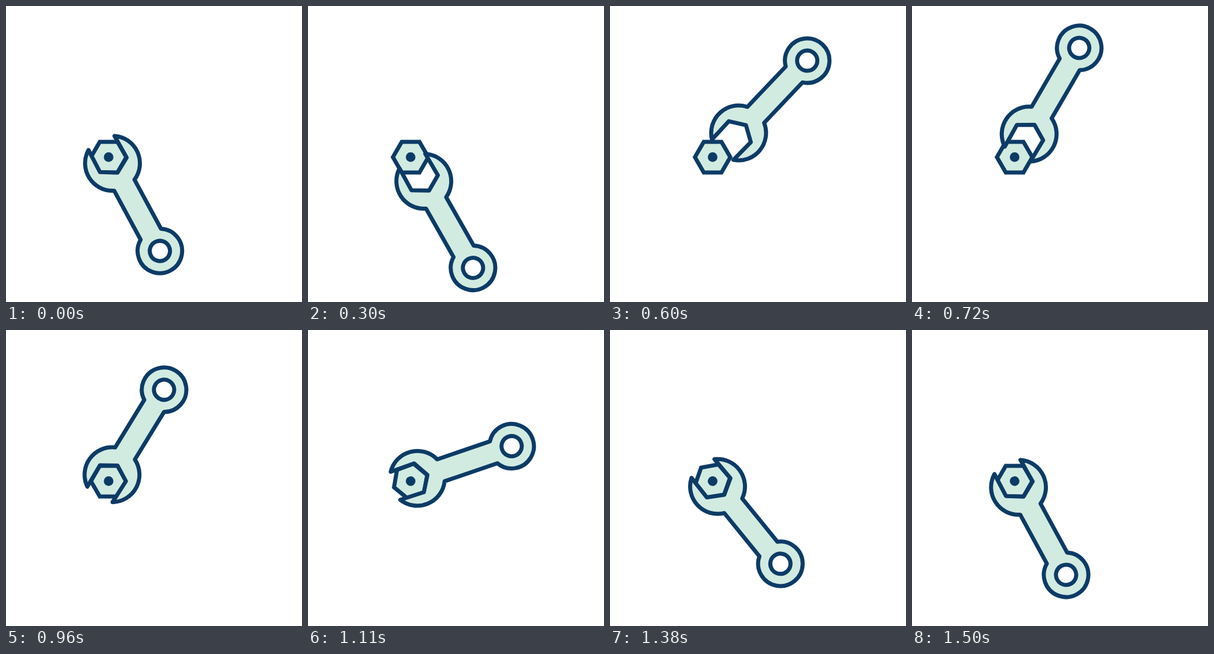
An HTML page that plays this animation: 512x512 px, repeating every 1.65 s.

```html
<!DOCTYPE html>
<html lang="en">
<head>
<meta charset="utf-8">
<title>Wrench and nut</title>
<style>
  html, body { margin: 0; width: 100%; height: 100%; overflow: hidden; background: #fff; }
  svg { display: block; width: 100%; height: 100%; }
</style>
</head>
<body>
<svg viewBox="0 0 512 512" fill="#d2ebe1" fill-rule="evenodd" stroke="#0d3b66" stroke-width="7" stroke-linejoin="round">
  <g id="nut">
    <path stroke-linejoin="miter" d="M30.6 0L15.3 26.5H-15.3L-30.6 0L-15.3-26.5H15.3Z"/>
    <circle r="8.3" fill="#0d3b66" stroke="none"/>
  </g>
  <!-- Head centre at the origin, handle along +x -->
  <path id="wrench" d="M-40-25.6A47.5 47.5 0 0 1 43-20H139.4A38.5 38.5 0 1 1 139.4 20H43
    A47.5 47.5 0 0 1-40 25.6L2.9 26.3L18.4 0L2.9-26.3Z
    M154.8 0a17.5 17.5 0 1 0 35 0a17.5 17.5 0 1 0-35 0Z"/>
</svg>
<script>
const LOOP = 1650, STEP = 30;
const NUT = [177.5, 261.4];
const GRIP = [12.6, -0.8];           // head centre relative to the nut, in wrench axes
const START = 61.6, END = -58.5;     // wrench angles while gripping
const OUT_LOW = [206, 314], OUT_HIGH = [205, 218];
const BULGE = 85;                    // sideways reach of the swing

const nut = document.getElementById("nut");
const wrench = document.getElementById("wrench");

const lerp = (a, b, k) => a + (b - a) * k;
const mix = (p, q, k) => p.map((v, i) => lerp(v, q[i], k));

function ease(t, from, to, power = 1) {
  const u = Math.min(1, Math.max(0, (t - from) / (to - from))) ** power;
  return u * u * (3 - 2 * u);
}

function gripped(angle) {
  const a = angle * Math.PI / 180, c = Math.cos(a), s = Math.sin(a);
  return [NUT[0] + GRIP[0] * c - GRIP[1] * s, NUT[1] + GRIP[0] * s + GRIP[1] * c];
}

function place(el, [x, y], angle) {
  el.setAttribute("transform", `translate(${x} ${y}) rotate(${angle})`);
}

function draw(t) {
  const pull = ease(t, 170, 365);
  const swing = ease(t, 350, 650);
  const tilt = ease(t, 365, 662);
  const push = ease(t, 665, 935);
  const turn = ease(t, 960, 1515, 0.73);

  let angle, head;
  if (turn > 0) {
    angle = lerp(END, START, turn);
    head = gripped(angle);
  } else {
    angle = lerp(lerp(START, 60, pull), lerp(-60, END, push), tilt);
    const low = mix(gripped(START), OUT_LOW, pull);
    const high = mix(OUT_HIGH, gripped(END), push);
    head = mix(low, high, swing * swing * (3 - 2 * swing));
    head[0] += 3 * swing * (1 - swing) * BULGE;
  }
  place(wrench, head, angle);
  place(nut, NUT, turn * (START - END));
}

function tick() {
  const t = performance.now() % LOOP;
  draw(Math.floor(t / STEP) * STEP);
  requestAnimationFrame(tick);
}
tick();
</script>
</body>
</html>
```
